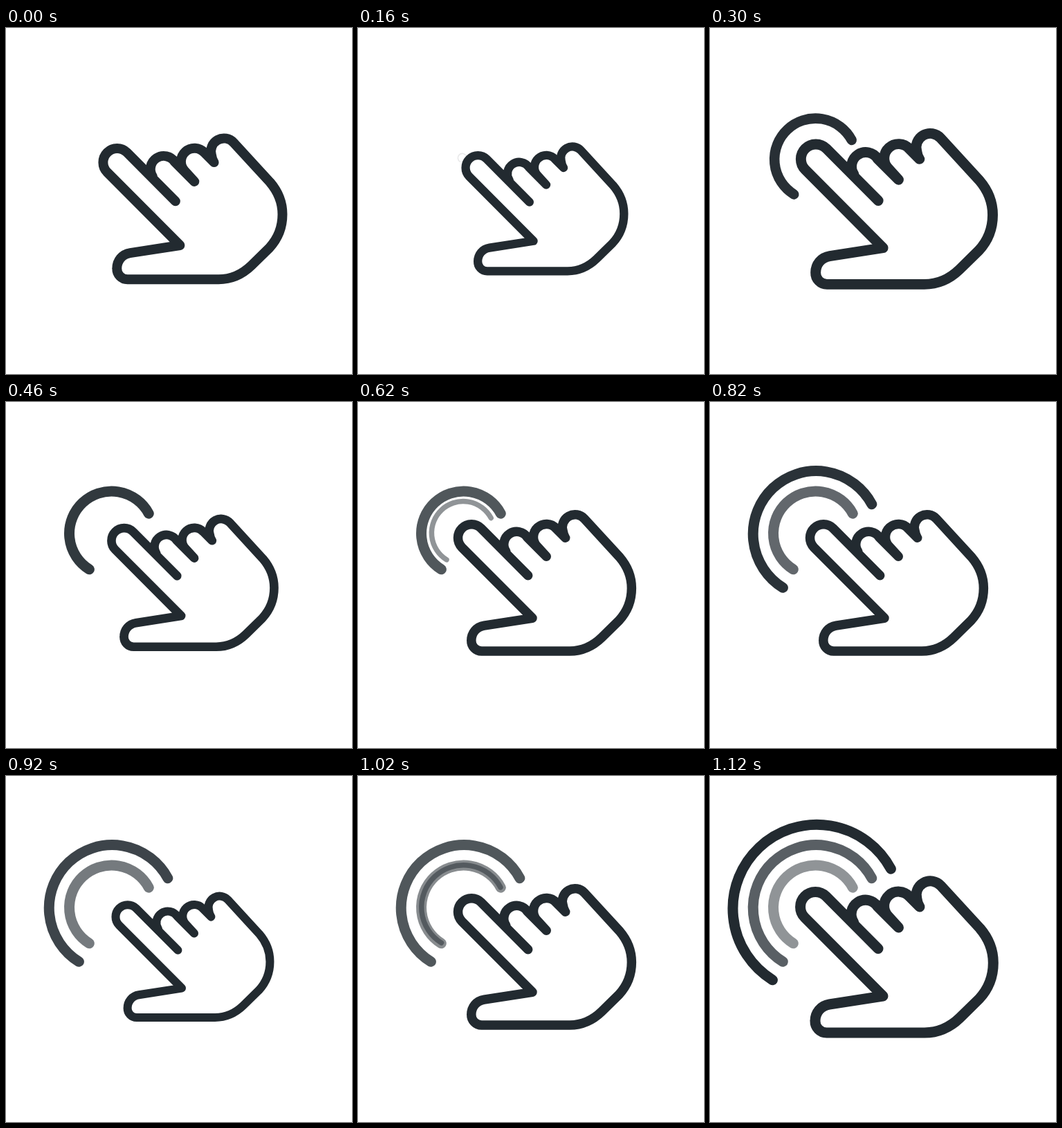
An HTML page for the animation above (1140 ms loop, 500 by 500 pixels).

```html
<!DOCTYPE html>
<html lang="en">
<head>
<meta charset="utf-8">
<title>Tap gesture</title>
<style>
  html, body { margin: 0; height: 100%; overflow: hidden; background: #fff; }
  svg { display: block; width: 100%; height: 100%; }
  path { fill: none; stroke: #222a30; stroke-width: 15; stroke-linecap: round; stroke-linejoin: round; }
</style>
</head>
<body>
<svg viewBox="0 0 500 500">
  <g id="rings"></g>
  <path id="hand" d="M243 249.5 L167.6 173.8 A21.7 21.7 0 0 0 136.9 204.5 L250 318
    L172.5 330 C160 332 152 342 152 354 A16.5 16.5 0 0 0 168.5 371 H310
    C330 371 347 363 361 349.5 L389 322 C402 308 409.3 290 409.3 270 C409.3 251 402 234 390 220
    L333.5 158.5 A20.3 20.3 0 0 0 299 178 Q300 185 303 189
    L288 174 A20.5 20.5 0 0 0 257 202 L272.5 219
    L242 188.5 A20.5 20.5 0 0 0 207.5 211"/>
</svg>
<script>
const LOOP = 1140, STEP = 20, BEAT = 400, HALF = BEAT / 2;
const hand = document.getElementById('hand');
const group = document.getElementById('rings');

const ease = x => {
  x = Math.min(1, Math.max(0, x));
  return x * x * (3 - 2 * x);
};

const scaleAbout = (x, y, s) => `translate(${x} ${y}) scale(${s}) translate(${-x} ${-y})`;

function makeRing(i) {
  const cx = 152.5 + 0.95 * i, cy = 190 + 0.8 * i, r = 61 + 30.2 * i;
  const at = deg => {
    const a = deg * Math.PI / 180;
    return `${cx + r * Math.cos(a)} ${cy + r * Math.sin(a)}`;
  };
  const path = document.createElementNS('http://www.w3.org/2000/svg', 'path');
  path.setAttribute('d', `M${at(-28.2)} A${r} ${r} 0 1 0 ${at(121.8)}`);
  return group.appendChild(path);
}

const rings = [0, 1, 2].map(makeRing);

function draw(t) {
  const beat = (t + 80) % BEAT / HALF;
  const press = ease(beat < 1 ? beat : 2 - beat);
  hand.setAttribute('transform', scaleAbout(270, 261, 1 - 0.2 * press));

  rings.forEach((ring, i) => {
    const age = t - 120 - BEAT * i;
    const grow = ease(age / HALF);
    const fade = ease((age - HALF) / BEAT) + ease((age - HALF - BEAT) / BEAT);
    ring.style.display = grow > 0 ? '' : 'none';
    ring.setAttribute('transform', scaleAbout(150.5, 187.5, grow));
    ring.setAttribute('opacity', grow * (1 - 0.25 * fade));
  });
}

function tick() {
  const t = performance.now() % LOOP;
  draw(Math.floor(t / STEP) * STEP);
  requestAnimationFrame(tick);
}
tick();
</script>
</body>
</html>
```
